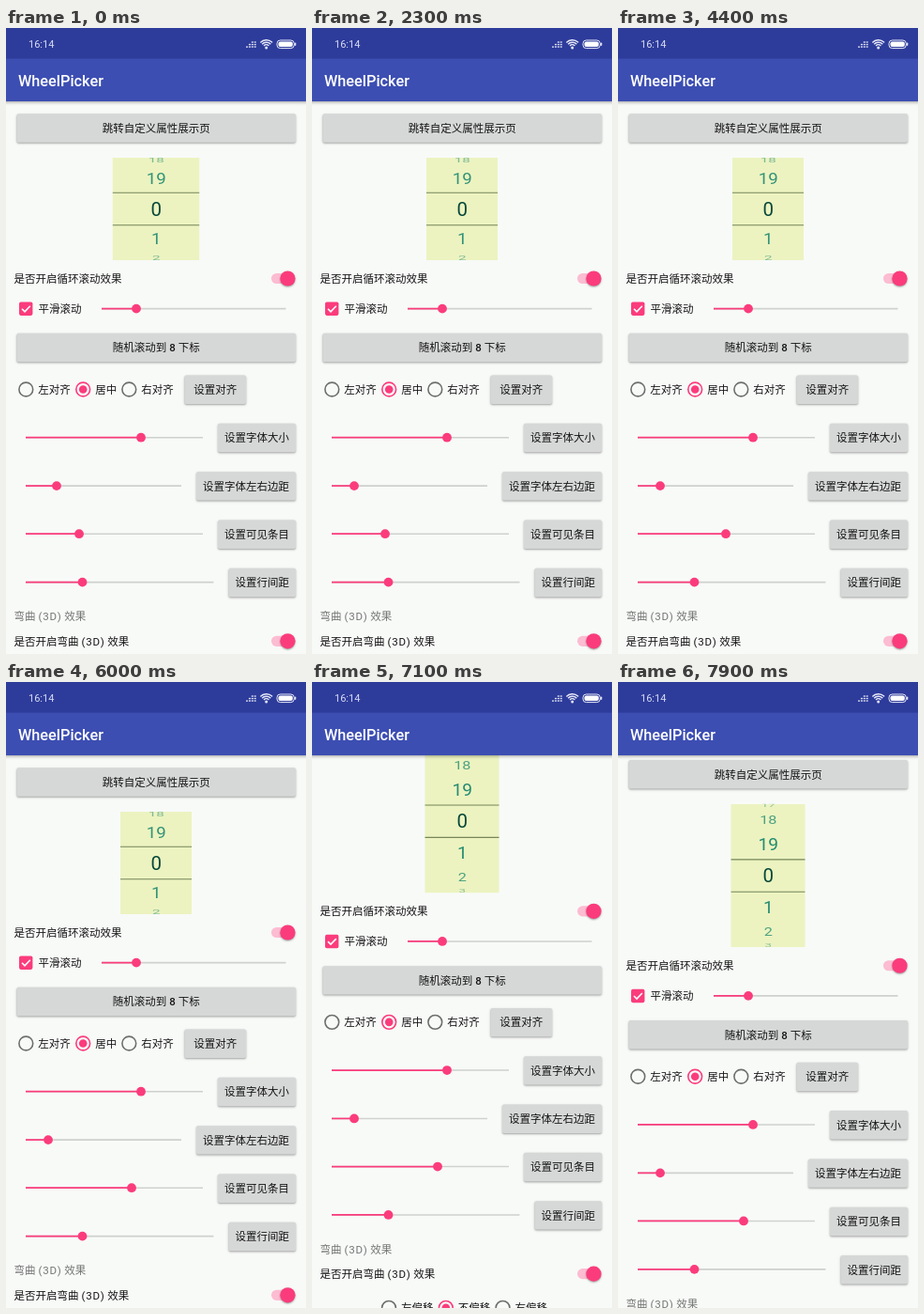
An HTML page with a canvas for the animation above (8000 ms loop, 320 by 666 pixels).

```html
<!DOCTYPE html>
<html lang="zh-CN">
<head>
<meta charset="utf-8">
<title>WheelPicker</title>
<style>
  html, body { margin: 0; width: 100%; height: 100%; overflow: hidden; background: #f8faf8; }
  canvas { display: block; width: 320px; height: 666px; }
</style>
</head>
<body>
<canvas></canvas>
<script>
const W = 320, H = 666, LOOP = 8000;
const PINK = '#fb3c7c', INK = '#151515', BG = '#f8faf8';
const FONT = 'Roboto, "Noto Sans CJK SC", "Noto Sans CJK", sans-serif';
const canvas = document.querySelector('canvas');
const ratio = window.devicePixelRatio || 1;
canvas.width = W * ratio;
canvas.height = H * ratio;
const c = canvas.getContext('2d');

// Motion: [time, value] keys
const SCROLL = [[6800, 0], [6900, 12], [7000, 38], [7100, 66], [7200, 82], [7300, 90], [7400, 94],
  [7500, 92], [7600, 83.6], [7700, 60], [7800, 32], [7900, 8.3], [8000, 3]];
const MARGIN = [[100, 54], [550, 42], [800, 45]];
const VISIBLE = [[3200, 78], [3800, 115], [4700, 115], [5500, 134]];

const clamp = v => Math.min(1, Math.max(0, v));
const ease = v => v * v * (3 - 2 * v);
function valueAt(keys, t, curve = v => v) {
  let value = keys[0][1];
  for (let i = 1; i < keys.length; i++) {
    const [t0, v0] = keys[i - 1], [t1, v1] = keys[i];
    if (t >= t0) value = v0 + (v1 - v0) * curve(clamp((t - t0) / (t1 - t0)));
  }
  return value;
}
// 0..1 while a finger holds something between two times
const held = (t, from, to) => clamp((t - from) / 100) * clamp((to - t) / 100);
const tapped = (t, at) => t < at ? 0 : clamp(1 - (t - at) / 450);

function text(s, x, y, { size = 11.5, color = INK, align = 'left', weight = 400, spacing = 0 } = {}) {
  c.font = `${weight} ${size}px ${FONT}`;
  c.letterSpacing = `${spacing}px`;
  c.fillStyle = color;
  c.textAlign = align;
  c.fillText(s, x, y + size * 0.37);
}

function box(x, y, w, h, r, color) {
  c.fillStyle = color;
  c.beginPath();
  c.roundRect(x, y, w, h, r);
  c.fill();
}

function disc(x, y, r, color) {
  c.fillStyle = color;
  c.beginPath();
  c.arc(x, y, r, 0, 7);
  c.fill();
}

function line(points, color, width) {
  c.strokeStyle = color;
  c.lineWidth = width;
  c.beginPath();
  points.forEach(([x, y]) => c.lineTo(x, y));
  c.stroke();
}

function shadowed(blur, offset, draw) {
  c.save();
  c.shadowColor = 'rgba(0,0,0,.36)';
  c.shadowBlur = blur * ratio;
  c.shadowOffsetY = offset * ratio;
  draw();
  c.restore();
}

function button(label, x0, x1, y, press = 0) {
  const shade = 214 - 16 * press;
  shadowed(2.2, 1, () => box(x0, y - 15.2, x1 - x0, 30.4, 1.7, `rgb(${shade},${shade + 1},${shade + 1})`));
  text(label, (x0 + x1) / 2, y, { align: 'center', weight: label.includes('8') ? 500 : 400 });
}

function slider(x0, x1, y, thumb, press = 0) {
  line([[x0, y], [x1, y]], '#cfd1cf', 1.6);
  line([[x0, y], [thumb, y]], PINK, 1.7);
  disc(thumb, y, 4.9 + 2.4 * press, PINK);
}

function radio(x, y, label, on) {
  c.strokeStyle = on ? PINK : '#6d6f6d';
  c.lineWidth = 1.6;
  c.beginPath();
  c.arc(x, y, 7.4, 0, 7);
  c.stroke();
  if (on) disc(x, y, 4.3, PINK);
  text(label, x + 13, y);
}

function toggle(y) {
  box(283, y - 5.6, 25, 11.2, 5.6, '#fcbcd2');
  shadowed(2, 1, () => disc(300.5, y, 8.1, PINK));
}

function curvedLabel(prefix, y, color) {
  const x = 8.5 + prefix.length * 11.5;
  text(prefix, 8.5, y, { color });
  text('(3D)', x + 3, y, { color, spacing: 0.8 });
  text('效果', x + 30.7, y, { color });
}

function wheel(count, width) {
  const radius = count * 10.9, top = 138, mid = top + radius, cx = 160;
  c.save();
  c.beginPath();
  c.rect(cx - width / 2, top, width, radius * 2);
  c.clip();
  c.fillStyle = '#ecf3c0';
  c.fillRect(0, top, W, radius * 2);
  const reach = (count - 1) / 2;
  for (let k = -reach; k <= reach; k++) {
    const angle = k * Math.PI / count, depth = Math.cos(angle);
    c.save();
    c.translate(cx + 0.3, mid + radius * Math.sin(angle));
    c.scale(1 / (1 + radius * (1 - depth) / 110), depth);
    c.globalAlpha = 0.3 + 0.7 * depth;
    text(String((k + 20) % 20), 0, -0.5, { size: 20.5, align: 'center', color: k ? '#15836c' : '#07483a' });
    c.restore();
  }
  for (const dy of [-17.2, 17.2]) line([[0, mid + dy], [W, mid + dy]], '#75855a', 1.1);
  c.restore();
}

function statusBar() {
  c.fillStyle = '#2d3b9b';
  c.fillRect(0, 0, W, 32.6);
  text('16:14', 24, 17.2, { size: 11, color: '#d9dcf0' });
  const pale = '#e6e8f6';
  for (let i = 0; i < 4; i++)
    for (let j = 0; j <= Math.min(i, 2); j++) box(256 + i * 2.9, 19.4 - j * 2.5, 2, 1.3, 0, pale);
  c.strokeStyle = pale;
  c.lineWidth = 1.4;
  for (const r of [3.6, 6.2, 8.7]) {
    c.beginPath();
    c.arc(277.7, 21.4, r, -Math.PI * 0.76, -Math.PI * 0.24);
    c.stroke();
  }
  disc(277.7, 21, 1.5, pale);
  c.lineWidth = 1;
  c.beginPath();
  c.roundRect(289, 13, 18.3, 8.6, 3.5);
  c.stroke();
  box(290.5, 14.5, 15.3, 5.6, 2, '#fff');
  box(307.9, 15.6, 1.4, 3.4, 0.7, pale);
}

function header() {
  shadowed(3.4, 1.5, () => {
    c.fillStyle = '#3c4eb2';
    c.fillRect(-5, 32, W + 10, 46);
  });
  statusBar();
  text('WheelPicker', 13, 56.2, { size: 16.3, color: '#fff', weight: 500 });
}

function settings(t) {
  toggle(266.5);
  text('是否开启循环滚动效果', 8.5, 266.5);

  box(14, 291.5, 14.4, 14.4, 1.8, PINK);
  line([[17, 298.8], [20, 301.8], [25.8, 295.8]], '#fff', 1.6);
  text('平滑滚动', 34.5, 298.8);
  slider(102, 298.5, 298.6, 139);

  button('随机滚动到 8 下标', 11.5, 309, 340);

  radio(21.3, 384.5, '左对齐', false);
  radio(82.2, 384.5, '居中', true);
  radio(131.3, 384.5, '右对齐', false);
  button('设置对齐', 190.5, 256, 384.8);

  slider(21, 210, 435.7, 144);
  button('设置字体大小', 226, 309, 436);
  slider(21, 187, 487.1, valueAt(MARGIN, t, ease), held(t, 50, 900));
  button('设置字体左右边距', 203, 309, 487.4, tapped(t, 1100));
  slider(21, 210, 538.2, valueAt(VISIBLE, t, ease), held(t, 3150, 3900) + held(t, 4650, 5600));
  button('设置可见条目', 226, 309, 538.7, Math.max(tapped(t, 4000), tapped(t, 6100)));
  slider(21, 221.5, 589.6, 81.5);
  button('设置行间距', 237.5, 309, 590);

  curvedLabel('弯曲', 626, '#747674');
  curvedLabel('是否开启弯曲', 652.3, INK);
  toggle(652.3);
  radio(82, 688.5, '左偏移', false);
  radio(142.8, 688.5, '不偏移', true);
  radio(203.5, 688.5, '右偏移', false);
}

function draw(t) {
  const tall = t >= 6100;
  c.setTransform(ratio, 0, 0, ratio, 0, 0);
  c.fillStyle = BG;
  c.fillRect(0, 0, W, H);
  c.save();
  c.translate(0, -valueAt(SCROLL, t));
  button('跳转自定义属性展示页', 11.5, 309, 106.5);
  wheel(tall ? 7 : 5, tall ? 79 : t >= 1100 ? 76 : 92.5);
  if (tall) c.translate(0, 43.5);
  settings(t);
  c.restore();
  header();
}

function frame() {
  draw(performance.now() % LOOP);
  requestAnimationFrame(frame);
}
frame();
</script>
</body>
</html>
```
